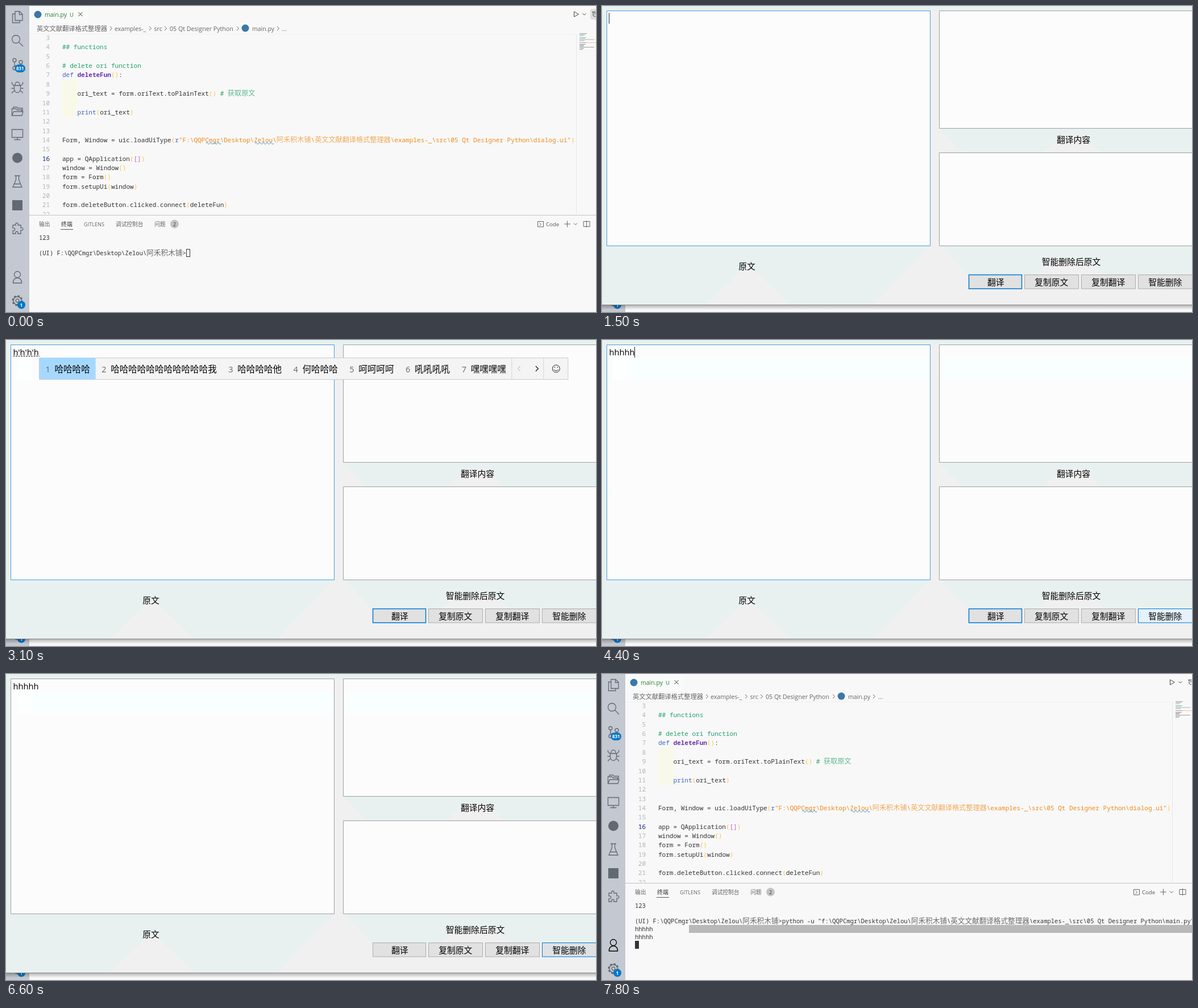
Write an HTML page that moves like this. It is 1038x539 px and loops after 8 s.

```html
<!DOCTYPE html>
<html lang="zh">
<head>
<meta charset="utf-8">
<title>Qt dialog demo</title>
<style>
html, body { margin: 0; width: 100%; height: 100%; overflow: hidden; background: #f8f8f8; }
svg { display: block; width: 100%; height: 100%; }
text { font-family: 'Open Sans', 'Noto Sans CJK SC', 'Noto Sans CJK', sans-serif; white-space: pre; }
.code, .term { font-family: 'Noto Sans Mono', 'DejaVu Sans Mono', monospace; fill: #333; }
.code { font-size: 11.02px; }
.term { font-size: 10.53px; }
.cjk { font-family: 'Noto Sans CJK SC', 'Noto Sans CJK', sans-serif; font-weight: 300; fill-opacity: .72; }
.code .cjk { font-size: 12.15px; }
.term .cjk { font-size: 12.62px; }
.green { fill: #22a06b; } .blue { fill: #3f66c4; } .fn { fill: #6a2fb0; font-weight: bold; }
.paren { fill: #ffc33c; } .square { fill: #c860d8; } .str { fill: #f08a1c; }
.num { fill: #b0b4b8; } .active { fill: #0b216f; }
.line { fill: none; stroke: #626973; stroke-width: 1.3; }
.thin { fill: none; stroke: #666; stroke-width: 1; }
</style>
</head>
<body>
<svg viewBox="0 0 1038 539" preserveAspectRatio="none">
  <defs>
    <linearGradient id="shade" x2="0" y2="1">
      <stop offset="0" stop-color="#000" stop-opacity=".3"/>
      <stop offset="1" stop-color="#000" stop-opacity="0"/>
    </linearGradient>
    <clipPath id="editorClip"><path d="M41 50H1038V367H41z"/></clipPath>
  </defs>

  <g id="editor">
    <path fill="#f8f8f8" d="M0 0H1038V539H0z"/>
    <path fill="#f9fbfa" d="M41 0H144V30H41z"/>
    <path fill="#c4c8d0" d="M0 0H41V539H0z"/>
    <g class="line">
      <path d="M16 9.500h8l5 5v11h-13zM23.500 9.500v5.500h5.500M16 14h-4.500v15.500h12.500v-4"/>
      <circle cx="17.500" cy="58.500" r="7"/><path d="M22.500 63.500l7.500 7.500"/>
      <circle cx="15" cy="95.500" r="3"/><circle cx="26" cy="99" r="3"/><circle cx="15" cy="109.500" r="3"/>
      <path d="M15 98.500v8M26 102c0 4-11 1-11 5"/>
      <path d="M14.500 140h11v6a5.500 6.500 0 0 1-11 0zM16 140v-2a4 4 0 0 1 8 0v2M14.500 141l-4-4v-3M25.500 141l4-4v-3M14.500 145h-5M25.500 145h5M15 149l-4 3v2M25 149l4 3v2"/>
      <path d="M10.500 193v-12h7l2 2h8v3M10.500 193l3-7h16.500l-2 7zM13 181v-3h6l2 2h8v5"/>
      <path d="M10.500 217.500h19v14h-19zM20 231.500v4M14.500 235.500h11"/>
      <path d="M15 299h10M17.500 299v7l-5.500 13h16l-5.500-13v-7M14 313.500h12"/>
      <path d="M12 386h5c-2-5 6-5 4 0h5v5c5-2 5 6 0 4v6h-5c2-5-6-5-4 0h-5v-5c5 1 5-6 0-5z"/>
      <circle cx="20" cy="519" r="8" stroke-width="3" stroke-dasharray="3.600 2.683"/>
      <circle cx="20" cy="519" r="7"/><circle cx="20" cy="519" r="2.800"/>
    </g>
    <g id="account" class="line">
      <circle cx="20" cy="473" r="5.500"/>
      <path d="M12.500 488c-1-12 16-12 15 0z"/>
    </g>
    <circle cx="20" cy="267.500" r="9" fill="#626973"/>
    <path fill="#626973" d="M11 342h18v18H11z"/>
    <rect x="15.500" y="103" width="18.500" height="14" rx="7" fill="#0078c8"/>
    <circle cx="27" cy="526.500" r="7" fill="#0078c8"/>
    <circle cx="56" cy="15" r="6.500" fill="#3b77a8"/>
    <circle cx="421" cy="39" r="6.500" fill="#3b77a8"/>

    <rect id="runHover" x="994.500" y="5" width="18.500" height="19" rx="3"/>
    <rect id="sideHover" x="1028" y="5" width="18" height="19" rx="3" fill="#dedede"/>
    <g class="thin">
      <path d="M127.500 11l7 7m0-7l-7 7" stroke="#333"/>
      <path d="M999.500 10l8 4.500-8 4.500zM1014.500 13l3 3 3-3" stroke="#444"/>
      <path d="M1031 10.500h4M1033 10v7l4 2M1036 9v6" stroke="#444"/>
      <path id="crumbs"/>
      <path d="M935.500 379.500h10v9.500h-10zM938.500 381.500l3 3-3 3M982 384h11M987.500 378.500v11M999 382.500l3 3 3-3M1016 379.500h11v9h-11zM1021.500 378v12"/>
      <path d="M1003.500 50V367" stroke="#e6e6e6"/>
      <path d="M41 49.500H1003" stroke="#f0f0f0"/>
    </g>
    <g clip-path="url(#editorClip)">
      <path fill="#f9f9ea" d="M99 130H126V195H99z"/>
      <path id="brackets" fill="#e8e8da" stroke="#b9b9b9" d="M219.500 261.500h5.500v15h-5.500zM238.500 261.500h5.500v15h-5.500z"/>
      <g id="code"></g>
      <path id="waves" fill="none" stroke="#2b8be0"/>
      <path id="editorCaret" d="M244 261h2v16h-2z"/>
    </g>
    <g id="minimap"></g>

    <path d="M41 368.500H1038" stroke="#c4c4c4"/>
    <path d="M96 393.500H118" stroke="#555"/>
    <circle cx="296.500" cy="384" r="7.500" fill="#c4c4c4"/>
    <g id="labels"></g>
    <path id="selection" fill="#b9b9b9" d="M153 442H1038V456H153z"/>
    <g id="terminal"></g>
    <rect id="termCursor" width="6" height="13" stroke="#333"/>
  </g>

  <g id="dialog">
    <path fill="url(#shade)" d="M0 526H1038V535H0z"/>
    <path fill="#e8f1f0" d="M0 0H1038V526H0z"/>
    <path fill="#f0f0f0" d="M257 455l74 71H183zM577 9h17v207l38 41h-38v166h3l48 52h393v51H477l100-103zM805 228h45l26 29h-98zM790 450h70l25 24H765z"/>
    <path d="M0 526.500H1038" stroke="#8a8a8a"/>
    <g fill="#fcfcfc" stroke="#a0a0a0">
      <path id="source" d="M8.500 8.500H577.500V422.500H8.500z"/>
      <path d="M593.500 8.500H1045V215.500H593.500zM593.500 258.500H1045V422.500H593.500z"/>
    </g>
    <path id="glow" fill="#f9ffff" d="M46 31H577V70H46zM594 31H1038V70H594z"/>
    <path id="glowStart" fill="#fdffff" d="M20 31H46V70H20z"/>
    <g id="buttons"></g>
    <g id="captions"></g>
    <text id="typed" x="12.500" y="27" font-size="14.700"></text>
    <path id="underline" stroke="#222" stroke-dasharray="3 1.500"/>
    <path id="caret" stroke="#222"/>
    <g id="ime"></g>
  </g>
</svg>
<script>
const $ = id => document.getElementById(id);
const show = (id, on) => $(id).style.display = on ? '' : 'none';
const markCjk = s => s.replace(/[\u4e00-\u9fff]+/g, '<tspan class="cjk">$&</tspan>');
const label = (x, y, size, s, fill = '#666', extra = '') =>
  `<text x="${x}" y="${y}" font-size="${size}" fill="${fill}" ${extra}>${s}</text>`;
const mono = (kind, x, y, s) => `<text class="${kind}" xml:space="preserve" x="${x}" y="${y}">${s}</text>`;

const home = String.raw`:\QQPCmgr\Desktop\Zelou\阿禾积木铺`;
const project = String.raw`\英文文献翻译格式整理器\examples-_\src\05 Qt Designer Python`;

// Editor: each run is "class|text" or plain text
const lines = {
  4: ['green|## functions'],
  6: ['green|# delete ori function'],
  7: ['blue|def ', 'fn|deleteFun', 'paren|()', ':'],
  9: ['    ori_text = form.oriText.toPlainText', 'paren|()', 'green| # 获取原文'],
  11: ['    ', 'blue|print', 'paren|(', 'ori_text', 'paren|)'],
  14: ['Form, Window = uic.loadUiType', 'paren|(', 'blue|r', `str|"F${home}${project}\\dialog.ui"`, 'paren|)'],
  16: ['app = QApplication', 'paren|(', 'square|[]', 'paren|)'],
  17: ['window = Window', 'paren|()'],
  18: ['form = Form', 'paren|()'],
  19: ['form.setupUi', 'paren|(', 'window', 'paren|)'],
  21: ['form.deleteButton.clicked.connect', 'paren|(', 'deleteFun', 'paren|)'],
};
const run = s => {
  const [kind, text] = s.includes('|') ? s.split('|') : ['', s];
  return `<tspan class="${kind}">${markCjk(text)}</tspan>`;
};
let code = '';
for (let n = 3; n <= 22; n++) {
  const y = 60 + (n - 3) * 16.36;
  const kind = n === 16 ? 'active' : 'num';
  code += mono('code', n < 10 ? 70.4 : 63.8, y, run(`${kind}|${n}`));
  if (lines[n]) code += mono('code', 99, y, lines[n].map(run).join(''));
}
$('code').innerHTML = code;
const wave = (x, count) => `M${x} 242` + 'q1.650 -3 3.300 0t3.300 0'.repeat(count);
$('waves').setAttribute('d', wave(352, 4) + wave(438, 5));
$('crumbs').setAttribute('d', [183, 252, 279, 406, 477].map(x => `M${x} 36l3.500 3.500-3.500 3.500`).join(''));

const strip = (x, y, w, fill) => `<rect x="${x}" y="${y}" width="${w}" height="1" fill="${fill}" opacity=".45"/>`;
$('minimap').innerHTML = [
  [48, 13, '#333'], [50, 10, '#333'], [52, 7, '#22a06b'], [55, 12, '#22a06b'], [56.5, 10, '#3f66c4'],
  [58.5, 26, '#555'], [60.5, 9, '#555'], [64, 29, '#f08a1c'], [67, 11, '#333'], [68.5, 8, '#333'],
  [70, 7, '#333'], [72, 26, '#333'], [74, 8, '#333'], [76, 6, '#333'],
].map(([y, w, fill]) => strip(1009, y, w, fill)).join('') + strip(1009, 64, 12, '#3f66c4');

const white = 'font-weight="700" text-anchor="middle"';
$('labels').innerHTML =
  label(68, 19, 10.5, 'main.py', '#2c7a2c') + label(112, 19, 9.6, 'U', '#2c7a2c') +
  label(54, 44, 11.27, '英文文献翻译格式整理器') + label(191, 44, 10.6, 'examples-_') +
  label(260.5, 44, 10.6, 'src') + label(288, 44, 10.67, '05 Qt Designer Python') +
  label(433, 44, 10.5, 'main.py') + label(485.5, 44, 10.6, '...') +
  label(58, 388, 9.75, '输出') + label(97, 388, 9.9, '终端', '#333') + label(137, 388, 9.15, 'GITLENS') +
  label(193, 388, 9.7, '调试控制台') + label(261, 388, 9.75, '问题') +
  label(296.5, 387.5, 9, '2', '#333', 'text-anchor="middle"') + label(950, 387.5, 9.6, 'Code', '#555') +
  label(24.8, 113, 8, '831', '#fff', white) + label(27, 530, 8.5, '1', '#fff', white);

// Terminal
const cell = 6.32;
const prompt = `(UI) F${home}>`;
const command = `python -u "f${home}${project}\\main.py"`;
const cells = s => [...s].reduce((sum, c) => sum + (c > '\u2fff' ? 2 : 1), 0);
const rowY = row => 412 + row * 13.72;
function drawTerminal(t) {
  const typed = command.slice(0, Math.max(0, 25 * (t / 100 - 7)));
  const printed = t >= 6700;
  const rows = ['123', '', prompt + typed, ...(printed ? ['hhhhh', 'hhhhh'] : [])];
  $('terminal').innerHTML = rows.map((s, i) => mono('term', 58, rowY(i), markCjk(s))).join('');
  const row = printed ? 5 : t >= 1200 ? 3 : 2;
  const cursor = $('termCursor');
  cursor.setAttribute('x', row === 2 ? Math.floor(58 + cell * cells(prompt + typed)) + .5 : 58.5);
  cursor.setAttribute('y', Math.floor(rowY(row) - 10.5) + .5);
  cursor.setAttribute('fill', t >= 7600 ? '#333' : 'none');
}

// Dialog
const centered = 'text-anchor="middle"';
$('buttons').innerHTML = ['翻译', '复制原文', '复制翻译', '智能删除'].map((s, i) => {
  const x = i ? 643.5 + i * 100 : 645.5;
  return `<rect id="button${i}" x="${x}" y="473.500" width="${i ? 95 : 93}" height="24.500" fill="#e1e1e1" stroke="#adadad"/>` +
    label(x + 47.3, 491.5, 14.8, s, '#000', centered);
}).join('');
$('captions').innerHTML = label(255, 464, 14.8, '原文', '#000', centered) +
  label(829.5, 240.5, 14.8, '翻译内容', '#000', centered) + label(825.5, 455.5, 14.8, '智能删除后原文', '#000', centered);

const laughs = '哈'.repeat(11) + '我';
const candidates = [
  '哈 好 和 会 还 很 后',
  '哈哈 呵呵 好好 嘿嘿 很好 还会 后悔',
  '哈哈哈 呵呵呵 嘿嘿嘿 哈哈哈哈 好哈哈 吼吼吼 何哈哈',
  `哈哈哈哈 ${laughs} 哈哈哈哈他 何哈哈哈 呵呵呵呵 吼吼吼吼 嘿嘿嘿嘿`,
  `哈哈哈哈哈 ${laughs} 哈哈哈哈哈他 何哈哈哈哈 呵呵呵呵呵 吼吼吼吼吼 嘿嘿嘿嘿嘿`,
];
function imeBar(count) {
  const left = 58.5 + (count - 4) * 12.4, size = 15.55;
  let x = left + 11, items = '', firstEnd;
  candidates[count - 1].split(' ').forEach((word, i) => {
    items += label(x, 56.5, 14.5, i + 1, '#666') + label(x + 16, 56.5, size, word, '#000');
    x += 16 + word.length * size + 20.5;
    firstEnd ??= x - 10.5;
  });
  const end = x - 10.5;
  return `<path fill="#f4f4f4" stroke="#ccc" d="M${left} 31.500H${end + 99}V69.500H${left}z"/>
    <path fill="#a6d8ff" d="M${left} 31H${firstEnd}V69H${left}z"/>${items}
    <path stroke="#d4d4d4" d="M${end} 32V69M${end + 56} 32V69"/>
    <path fill="none" stroke="#aaa" d="M${end + 15} 46l-4.500 4.500 4.500 4.500"/>
    <path fill="none" stroke="#222" stroke-width="1.300" d="M${end + 42} 46l4.500 4.500-4.500 4.500"/>
    <circle cx="${end + 78}" cy="50.500" r="6.500" fill="none" stroke="#222"/>
    <path fill="none" stroke="#222" d="M${end + 74} 52q4 4.500 8 0M${end + 75.5} 47v2M${end + 80.5} 47v2"/>`;
}

const mix = (a, b, k) => `rgb(${a.map((v, i) => v + (b[i] - v) * Math.min(1, Math.max(0, k)))})`;
const idle = [225, 225, 225], hover = [229, 241, 251], pressed = [204, 228, 247];
const gray = [173, 173, 173], accent = [0, 120, 215];
function deleteFill(t) {
  if (t < 4600) return mix(idle, hover, (t - 3800) / 600);
  if (t < 5800) return mix(pressed, hover, (t - 5000) / 300);
  if (t < 6200) return mix(hover, pressed, (t - 5700) / 200);
  return mix(pressed, idle, (t - 6100) / 600);
}
function outline(id, color, width = 1) {
  $(id).setAttribute('stroke', color);
  $(id).setAttribute('stroke-width', width);
}

function drawDialog(t) {
  const composing = t >= 2700 && t < 3500;
  const count = composing ? Math.min(5, Math.floor((t - 2700) / 130) + 1) : 0;
  const clicked = t >= 4600;
  $('typed').textContent = t >= 3500 ? 'hhhhh' : Array(count).fill('h').join("'");
  show('ime', composing);
  show('underline', composing);
  if (composing) {
    $('ime').innerHTML = imeBar(count);
    $('underline').setAttribute('d', `M12.500 28.500H${59 + (count - 4) * 12.4}`);
  }
  const caretOn = t < 2000 || (t >= 2500 && t < 2700) || (t >= 3500 && t < 3900) || (t >= 4400 && !clicked);
  show('caret', caretOn);
  $('caret').setAttribute('d', `M${t < 3500 ? 12.5 : 57.5} 12V31`);
  show('glow', t >= 3500);
  show('glowStart', t >= 2900);
  outline('source', clicked ? '#a0a0a0' : '#4a9be0');
  outline('button0', clicked ? '#adadad' : '#0078d7', clicked ? 1 : 1.5);
  outline('button3', mix(gray, accent, (t - 3800) / 600));
  $('button3').setAttribute('fill', deleteFill(t));
}

function draw(t) {
  const dialogOpen = t >= 1500 && t < 6700;
  show('dialog', dialogOpen);
  if (dialogOpen) return drawDialog(t);
  drawTerminal(t);
  show('sideHover', t < 100);
  show('runHover', t >= 200 && t < 1500);
  $('runHover').setAttribute('fill', t < 500 ? '#e4e4e4' : '#dcdcdc');
  show('brackets', (t >= 800 && t < 1500) || (t >= 6900 && t < 7600));
  show('editorCaret', (t >= 800 && t < 1500) || (t >= 6700 && t < 7300));
  show('selection', t >= 7700);
  $('account').style.stroke = t >= 7800 ? '#000' : '';
}

let last = -1;
function tick() {
  const t = Math.floor(performance.now() % 8000 / 100) * 100;
  if (t !== last) draw(last = t);
  requestAnimationFrame(tick);
}
tick();
</script>
</body>
</html>
```
